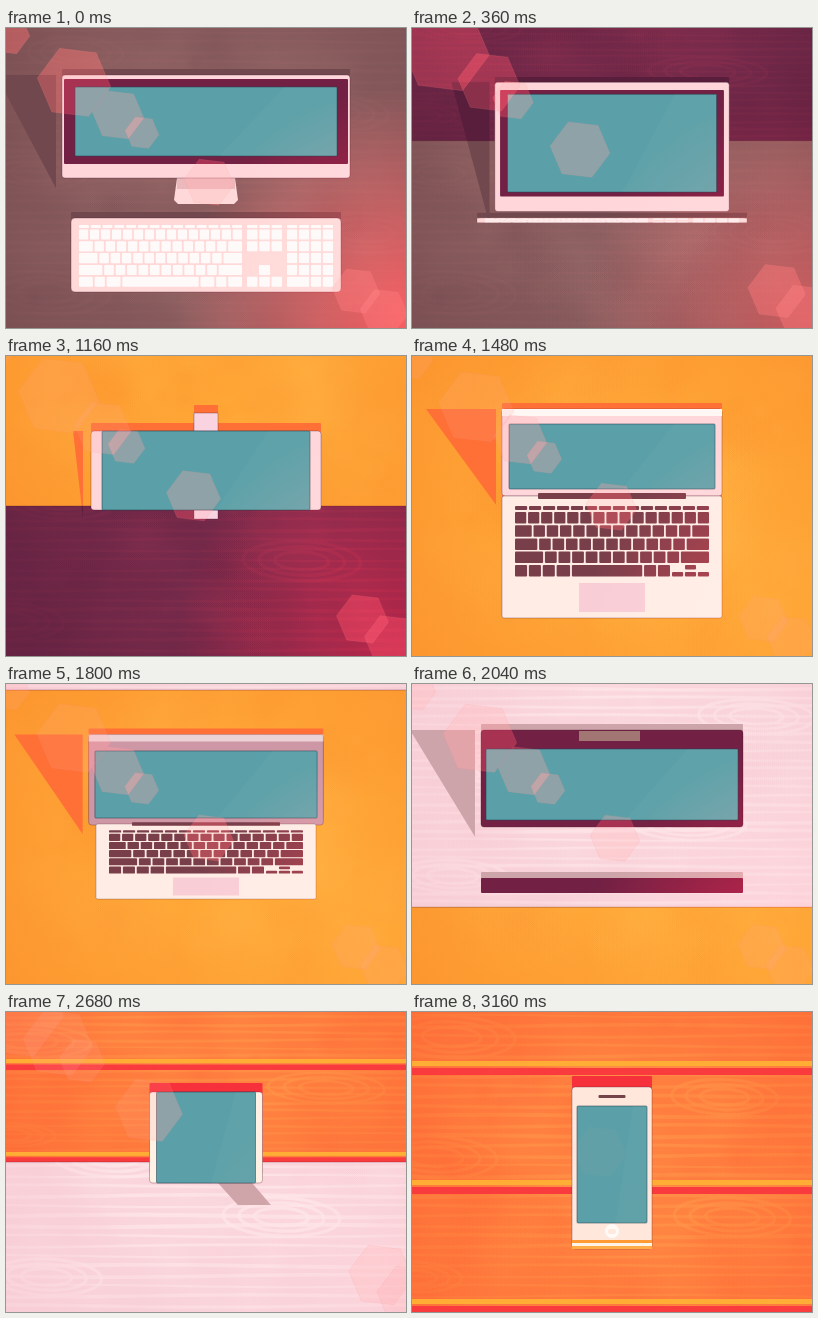
An HTML page with a canvas that plays this animation: 400x300 px, repeating every 3.2 s.

```html
<!DOCTYPE html>
<html lang="en">
<head>
<meta charset="utf-8">
<title>Devices</title>
<style>
html, body { margin: 0; width: 100%; height: 100%; overflow: hidden; }
canvas { display: block; width: 400px; height: 300px; }
</style>
</head>
<body>
<canvas id="stage" width="400" height="300"></canvas>
<script>
const W = 400, H = 300, MID = W / 2, LOOP = 3200;
const ctx = document.getElementById('stage').getContext('2d');

const lerp = (a, b, p) => a + (b - a) * p;
const clamp = v => Math.max(0, Math.min(1, v));
const part = (t, a, b) => clamp((t - a) / (b - a));
const same = n => Array(n).fill(1);
const rgb = (c, a = 1) => `rgba(${c.map(Math.round)},${a})`;
const ease = {
  in: p => p ** 3,
  out: p => 1 - (1 - p) ** 3,
  both: p => p < .5 ? 4 * p ** 3 : 1 - 4 * (1 - p) ** 3
};
// Rises from a to b, stays, falls from c to d.
const pulse = (t, a, b, c, d) => Math.min(ease.out(part(t, a, b)), 1 - ease.in(part(t, c, d)));

function random(seed) {
  return () => (seed = seed * 16807 % 2147483647) / 2147483647;
}

// ---- Backgrounds ----
const DARK = [114, 33, 68], TEAL = [91, 160, 168];

function radial(g, x, y, r0, r1, color, a0, a1) {
  const fill = g.createRadialGradient(x, y, r0, x, y, r1);
  fill.addColorStop(0, rgb(color, a0));
  fill.addColorStop(1, rgb(color, a1));
  g.fillStyle = fill;
  g.fillRect(0, 0, W, H);
}

function surface({ base, light, dark, wood, bands }, seed) {
  const cv = document.createElement('canvas');
  cv.width = W;
  cv.height = H;
  const g = cv.getContext('2d'), rnd = random(seed);
  g.fillStyle = rgb(base);
  g.fillRect(0, 0, W, H);
  if (wood) {
    g.strokeStyle = rgb(light, wood);
    for (let y = 4; y < H; y += 10) {
      g.lineWidth = 2 + rnd() * 2;
      g.beginPath();
      for (let x = 0; x <= W; x += 20) g.lineTo(x, y + Math.sin(x / 70 + y) * 1.2);
      g.stroke();
    }
    for (let i = 0; i < 5; i++) {
      const x = i % 2 * 260 + rnd() * 110, y = 25 + i * 60, r = 45 + rnd() * 20;
      for (let k = 1; k > .2; k -= .27) {
        g.beginPath();
        g.ellipse(x, y, r * k, r * k * .33, .04, 0, 7);
        g.stroke();
      }
    }
  }
  for (let i = 0; i < 120; i++) {
    const r = 10 + rnd() * 45;
    radial(g, rnd() * W, rnd() * H, 0, r, i % 2 ? light : dark, .13, 0);
  }
  radial(g, 215, 150, 90, 260, dark, 0, .6);
  if (bands) for (let y = 49; y < H; y += 119) {
    g.fillStyle = '#ffad35';
    g.fillRect(0, y, W, 5);
    g.fillStyle = '#fa3b3d';
    g.fillRect(0, y + 7, W, 7);
  }
  return cv;
}

const grounds = [
  { base: [143, 98, 99], light: [165, 112, 110], dark: [112, 70, 75], shade: [112, 72, 77],
    wood: .2, from: -1, to: 0 },
  { base: [118, 42, 75], light: [150, 50, 80], dark: [88, 30, 60], shade: [88, 30, 60],
    wood: .28, from: 160, to: 600 },
  { base: [255, 166, 54], light: [255, 185, 80], dark: [250, 140, 42], shade: [255, 112, 54],
    from: 900, to: 1420 },
  { base: [250, 214, 220], light: [255, 232, 235], dark: [247, 200, 210], shade: [204, 164, 169],
    wood: .7, from: 1704, to: 2264 },
  { base: [255, 127, 64], light: [255, 150, 72], dark: [253, 98, 50], shade: [246, 49, 59],
    wood: .6, bands: true, from: 2420, to: 2940 }
];
grounds.forEach((g, i) => g.image = surface(g, 71 + i * 37));

// ---- Devices ----
// All are centered: side, head and foot are the margins around the screen.
const device = options =>
  ({ bezel: 0, shadow: 6, wedge: 0, color: [255, 215, 218], ...options });
const poses = {
  desktop: device({ top: 47, w: 288, h: 103, side: 13, head: 12, foot: 22, bezel: 10, wedge: 60 }),
  tablet: device({ top: 67, w: 141, h: 175, side: 12, head: 12, foot: 15, shadow: 4 }),
  wide: device({ top: 75, w: 230, h: 79, side: 11, head: 0, foot: 0, shadow: 8, wedge: 10 }),
  laptop: device({ top: 53, w: 220, h: 87, side: 7, head: 15, foot: 7, wedge: 70 }),
  monitor: device({ top: 46, w: 262, h: 97, side: 5, head: 19, foot: 7, wedge: 65, color: DARK }),
  square: device({ top: 80, w: 113, h: 91, side: 7, head: 0, foot: 0, shadow: 9, color: [255, 241, 227] }),
  phone: device({ top: 75, w: 80, h: 162, side: 5, head: 19, foot: 26, shadow: 11, color: [255, 231, 219] })
};
const steps = [
  [0, 'desktop'], [180, 'desktop'], [580, 'tablet', 'both'], [880, 'tablet'],
  [1160, 'wide', 'in'], [1400, 'laptop', 'out'], [1640, 'laptop'],
  [2000, 'monitor', 'both'], [2400, 'monitor'], [2680, 'square', 'in'],
  [2940, 'phone', 'out'], [LOOP, 'phone']
];

function poseAt(t) {
  const i = steps.findIndex(s => s[0] > t);
  const [t0, from] = steps[i - 1], [t1, to, curve = 'both'] = steps[i];
  const k = ease[curve](part(t, t0, t1)), a = poses[from], b = poses[to], d = {};
  for (const name in a) if (name != 'color') d[name] = lerp(a[name], b[name], k);
  d.color = a.color.map((v, n) => lerp(v, b.color[n], k));
  d.left = MID - d.w / 2;
  return d;
}

// ---- Drawing helpers ----
function box(x, y, w, h, color, radius = 1, line) {
  ctx.beginPath();
  ctx.roundRect(x, y, Math.max(0, w), Math.max(0, h), radius);
  ctx.fillStyle = color;
  ctx.fill();
  if (line) {
    ctx.strokeStyle = line;
    ctx.lineWidth = .9;
    ctx.stroke();
  }
}
const centered = (y, w, h, ...style) => box(MID - w / 2, y, w, h, ...style);
const EDGE = 'rgba(70,25,45,.35)';

function poly(points, color) {
  ctx.beginPath();
  points.forEach(p => ctx.lineTo(...p));
  ctx.closePath();
  ctx.fillStyle = color;
  ctx.fill();
}

// Squeezes a drawing vertically toward its top edge.
function unfold(top, k, paint) {
  if (k < .01) return;
  ctx.save();
  ctx.translate(0, top);
  ctx.scale(1, k);
  ctx.translate(0, -top);
  paint();
  ctx.restore();
}

function fade(alpha, paint) {
  ctx.save();
  ctx.globalAlpha = alpha;
  paint();
  ctx.restore();
}

function keyRow(x0, x1, y, h, units, color) {
  const gap = 1.8, unit = (x1 - x0 + gap) / units.reduce((a, b) => a + b);
  let x = x0;
  for (const u of units) {
    box(x, y, u * unit - gap, h, color);
    x += u * unit;
  }
}

function letterKeys(x0, x1, y, pitch, color) {
  for (let i = 0; i < 4; i++) {
    const end = 1 + i * .4;
    keyRow(x0, x1, y + i * pitch, pitch - 1.7, [end, ...same(13 - i), end], color);
  }
}

function desktopKeys() {
  centered(190, 270, 74, '#ffd9d8', 4, EDGE);
  const color = '#fffafa', y = 201.5, pitch = 11.8, h = 10;
  keyRow(73, 236, 197, 3, same(14), color);
  letterKeys(73, 236, y, pitch, color);
  keyRow(73, 236, y + 4 * pitch, h, [1.3, 1, 1.3, 6.5, 1.3, 1, 1.3], color);
  keyRow(241, 276, 197, 3, same(3), color);
  keyRow(281, 327, 197, 3, same(4), color);
  for (let i = 0; i < 5; i++) {
    if (i < 2 || i == 4) keyRow(241, 276, y + i * pitch, h, same(3), color);
    keyRow(281, 327, y + i * pitch, h, i == 4 ? [2, 1, 1] : same(4), color);
  }
  box(253, y + 3 * pitch, 11, h, color);
}

function laptopBase() {
  const color = '#783f4b';
  centered(140, 220, 122, '#ffece5', 2, EDGE);
  centered(137, 148, 6, color);
  keyRow(103, 297, 150, 4, same(14), color);
  letterKeys(103, 297, 156, 13.2, color);
  keyRow(103, 258, 209, 11.5, [1, 1, 1, 1.1, 5.2, 1, 1], color);
  keyRow(260, 297, 216, 4.5, same(3), color);
  box(273, 209, 11, 4.5, color);
  centered(227, 66, 29, '#f9cdd6', 0);
}

function standFoot() {
  poly([[171, 150], [229, 150], [232, 172], [228, 176], [172, 176], [168, 172]], '#ffd9d9');
  centered(150, 58, 11, 'rgba(190,110,120,.3)', 0);
}

// ---- Light ----
// Position along the beam and size of each ring.
const rings = [[2, 22], [68, 37], [112, 26], [136, 17], [203, 25], [350, 24], [378, 24]];
const LIGHT = [255, 145, 145];

function drawLight(t) {
  const u = t % 2000 / 2000, turn = .34;
  const swing = u < turn ? ease.both(u / turn) : (1 - part(u, turn, 1)) ** 3;
  const power = 1 - .9 * part(t, 2700, 3000);
  ctx.save();
  ctx.globalCompositeOperation = 'overlay';
  radial(ctx, 400, 290, 0, 230, LIGHT, power * (.95 - .6 * swing), 0);
  for (const [at, size] of rings) {
    const x = at + swing * (at > 300 ? 25 : -60);
    const y = at * .74 + 4 - swing * (at > 300 ? 0 : 56);
    const r = size * (1 + .35 * swing);
    const points = same(6).map((_, k) => {
      const q = k * Math.PI / 3 + .12;
      return [x + Math.cos(q) * r, y + Math.sin(q) * r];
    });
    ctx.globalCompositeOperation = 'overlay';
    poly(points, rgb(LIGHT, power * .35));
    ctx.globalCompositeOperation = 'source-over';
    ctx.fillStyle = rgb(LIGHT, power * .14);
    ctx.fill();
    ctx.strokeStyle = rgb(LIGHT, power * .15);
    ctx.stroke();
  }
  ctx.restore();
}

// ---- Scene ----
function drawGround(g, t, d, solids, kick) {
  const p = ease.both(part(t, g.from, g.to)), edge = H * p;
  if (t < g.from || !edge) return;
  const scale = .56 + .44 * p, shade = rgb(g.shade), s = d.shadow, left = d.left - s;
  ctx.save();
  ctx.beginPath();
  ctx.rect(0, 0, W, edge);
  ctx.clip();
  ctx.drawImage(g.image, 0, edge - H * scale, W, H * scale);
  poly([[left - d.wedge, d.top], [left, d.top], [left, d.top + d.h * 1.1]], shade);
  for (const [y, w, h] of solids) centered(y - s, w, h, shade);
  ctx.restore();
  if (kick) {
    const h = 22 * kick;
    ctx.save();
    ctx.beginPath();
    ctx.rect(0, 0, W, edge);
    ctx.clip();
    poly([[212, 171], [246, 171], [246 + h * .86, 171 + h], [212 + h * .9, 171 + h]], shade);
    ctx.restore();
  }
  if (edge < H) {
    ctx.fillStyle = 'rgba(80,25,45,.3)';
    ctx.fillRect(0, edge - .5, W, 1);
  }
}

function drawDevice(d) {
  const x = d.left + d.side, y = d.top + d.head;
  const w = d.w - 2 * d.side, h = d.h - d.head - d.foot, m = d.bezel;
  box(d.left, d.top, d.w, d.h, rgb(d.color), 3, EDGE);
  if (m) box(x - m - 1, y - m + 2, w + 2 * m + 2, h + 2 * m - 4, rgb(DARK));
  box(x, y, w, h, rgb(TEAL), 1, 'rgba(35,65,85,.6)');
  poly([[x + w * .55, y + h], [x + w * .8, y], [x + w, y], [x + w, y + h]], 'rgba(130,170,175,.12)');
}

function draw(t) {
  const d = poseAt(t);
  const stand = 1 - ease.both(part(t, 180, 420));
  const base = pulse(t, 1160, 1400, 1640, 1860);
  const tabs = pulse(t, 1040, 1160, 1180, 1320);
  const bar = pulse(t, 1840, 2020, 2380, 2540);
  const notch = pulse(t, 1880, 2020, 2080, 2240);
  const kick = pulse(t, 2540, 2660, 2700, 2820);
  const fold = ease.out(part(t, 3040, 3160));

  // Top, width and height of everything that casts a shadow.
  const solids = [
    [d.top, d.w, d.h],
    [190, 270, 74 * stand],
    [140, 220, 122 * base],
    [194, 262, 15 * bar],
    [75 - 18 * tabs, 24, 79 + 27 * tabs]
  ].filter((s, i) => [1, stand, base, bar, tabs][i]);
  const offset = solids.map(([y, w, h]) => [y, w, h]);

  for (const g of grounds) {
    ctx.save();
    drawGround(g, t, d, offset, kick);
    ctx.restore();
  }

  if (tabs) centered(75 - 18 * tabs, 24, 79 + 27 * tabs, '#f9d3df', 0, EDGE);
  unfold(150, stand, standFoot);
  unfold(190, stand, desktopKeys);
  drawDevice(d);
  fade(base, () => box(d.left, d.top, d.w, 7, '#fff7f3', 0));
  unfold(140, base, laptopBase);
  if (notch) box(167, 47, 61, 10 * notch, '#a27672', 0);
  if (bar) centered(194, 262, 15 * bar, rgb(DARK));

  fade(pulse(t, 480, 580, 880, 980), () => centered(235, 9, 5, '#fff5f2', 2));
  fade(ease.out(part(t, 2800, 2940)), () => {
    centered(83, 27, 3, '#74434a');
    centered(212, 14, 14, '#fffaf5', 7);
    centered(217, 8, 5, '#ffe9df', 2);
  });
  ['#ff9a35', '#fff3e6', '#ffab48'].forEach((color, i) => {
    if (fold) centered(228 + i * 3 * fold, 80, 3 * fold, color, 0);
  });
  drawLight(t);
}

// Shadows fall up and to the left, so shift the centered boxes while painting them.
const paintGround = drawGround;
drawGround = function (g, t, d, solids, kick) {
  const plain = centered;
  paintGround(g, t, d, solids, kick);
};

const start = performance.now();
function tick() {
  const t = (performance.now() - start) % LOOP;
  draw(Math.floor(t / 40) * 40);
  requestAnimationFrame(tick);
}
tick();
</script>
</body>
</html>
```
